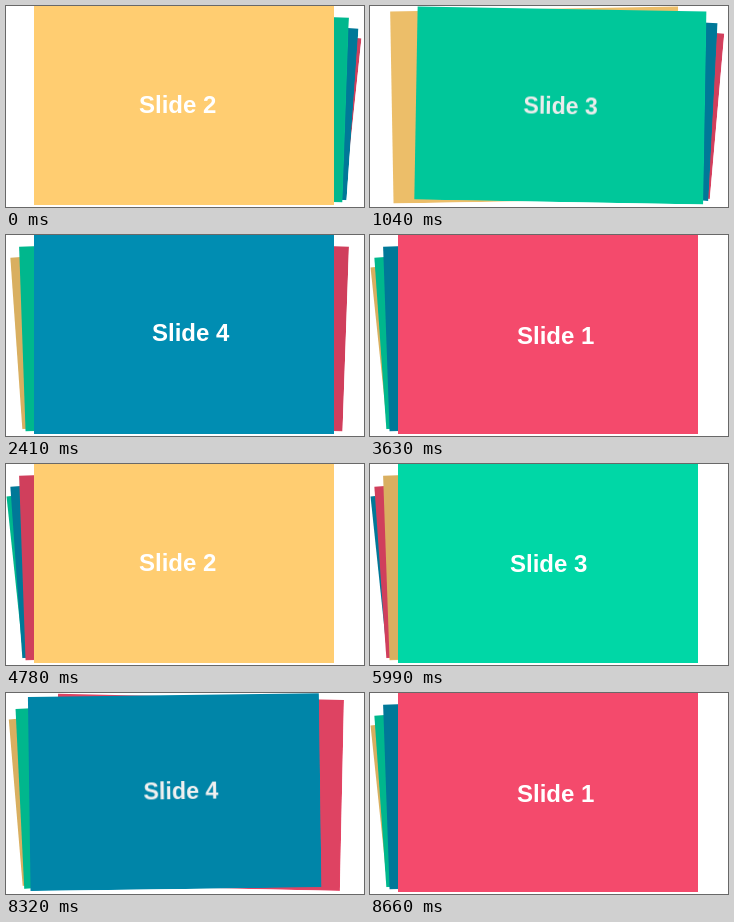
An HTML page for the animation above (8990 ms loop, 358 by 201 pixels).

```html
<!DOCTYPE html>
<html lang="en">
<head>
<meta charset="utf-8">
<title>Card stack slider</title>
<style>
  html, body { margin: 0; width: 100%; height: 100%; overflow: hidden; background: #fff; }
  .stage { position: absolute; left: 0; top: 0; width: 358px; height: 201px; overflow: hidden; }
  .view { position: absolute; left: 28px; top: -1px; width: 300px; height: 200px; perspective: 1200px; }
  .deck { position: absolute; inset: 0; transform-style: preserve-3d; }
  .card {
    position: absolute; inset: 0; overflow: hidden;
    transform-origin: center bottom; backface-visibility: hidden;
    color: #fff; font: bold 24px/24px "Liberation Sans", Arial, sans-serif;
  }
  .label { position: absolute; white-space: pre; }
  .shade { position: absolute; inset: 0; background: rgba(0, 0, 0, .15); }
</style>
</head>
<body>
<div class="stage"><div class="view"><div class="deck"></div></div></div>
<script>
  const LOOP = 8990;
  const SPEED = 450;

  // place: cards to the left are positive, to the right negative
  const cards = [
    { text: 'Slide 1', color: '#f44a6c', x: 119, y: 90, place: -3 },
    { text: 'Slide 2', color: '#ffcd71', x: 105, y: 88, place: 0 },
    { text: 'Slide 3', color: '#00d7a6', x: 112, y: 89, place: -1 },
    { text: 'Slide 4', color: '#008db2', x: 118, y: 87, place: -2 }
  ];

  // first step, last step, number of steps, time already run at the first step
  const moves = [
    [920, 1260, 6, 65],
    [1990, 2410, 7, 40],
    [3210, 3630, 7, 40],
    [4360, 4780, 7, 40],
    [5580, 5990, 7, 40],
    [6850, 7260, 7, 40],
    [8250, 8660, 7, 40]
  ];

  const deck = document.querySelector('.deck');
  const add = (parent, name) => {
    const el = document.createElement('div');
    el.className = name;
    return parent.appendChild(el);
  };

  for (const card of cards) {
    card.el = add(deck, 'card');
    card.el.style.background = card.color;
    const label = add(card.el, 'label');
    label.textContent = card.text;
    label.style.left = card.x + 'px';
    label.style.top = card.y + 'px';
    card.shade = add(card.el, 'shade');
  }

  const lerp = (a, b, k) => a + (b - a) * k;

  // cubic-bezier(.25, .1, .25, 1)
  function ease(x) {
    if (x >= 1) return 1;
    const curve = (a, b, s) => 3 * a * s * (1 - s) ** 2 + 3 * b * s * s * (1 - s) + s ** 3;
    let lo = 0, hi = 1;
    for (let i = 0; i < 24; i++) {
      const mid = (lo + hi) / 2;
      if (curve(.25, .25, mid) < x) lo = mid; else hi = mid;
    }
    return curve(.1, 1, lo);
  }

  function pose(p) {
    const d = Math.abs(p);
    return [-p * (8 - d * .75), -100 * d, -2 * p, Math.min(d, 1)];
  }

  function stepProgress([first, last, count, lead], t) {
    if (t >= last) return 1;
    const gap = (last - first) / (count - 1);
    const step = Math.floor((t - first) / gap);
    return ease((lead + step * gap) / SPEED);
  }

  function draw(t) {
    const begun = moves.filter(m => t >= m[0]);
    const k = begun.length ? stepProgress(begun[begun.length - 1], t) : 1;

    for (const card of cards) {
      let from = card.place, to = card.place;
      for (let i = 0; i < begun.length; i++) {
        from = to === 3 ? -1 : to;   // the last card on the left rejoins on the right
        to = from + 1;
      }
      const a = pose(from), b = pose(to);
      const [x, z, turn, shade] = a.map((v, i) => lerp(v, b[i], k));
      card.el.style.transform = `translate3d(${x}%, 0, ${z}px) rotateZ(${turn}deg)`;
      card.el.style.zIndex = 10 - Math.round(Math.abs(lerp(from, to, k)));
      card.shade.style.opacity = shade;
    }
  }

  const start = performance.now();
  function tick() {
    draw((performance.now() - start) % LOOP);
    requestAnimationFrame(tick);
  }
  tick();
</script>
</body>
</html>
```
